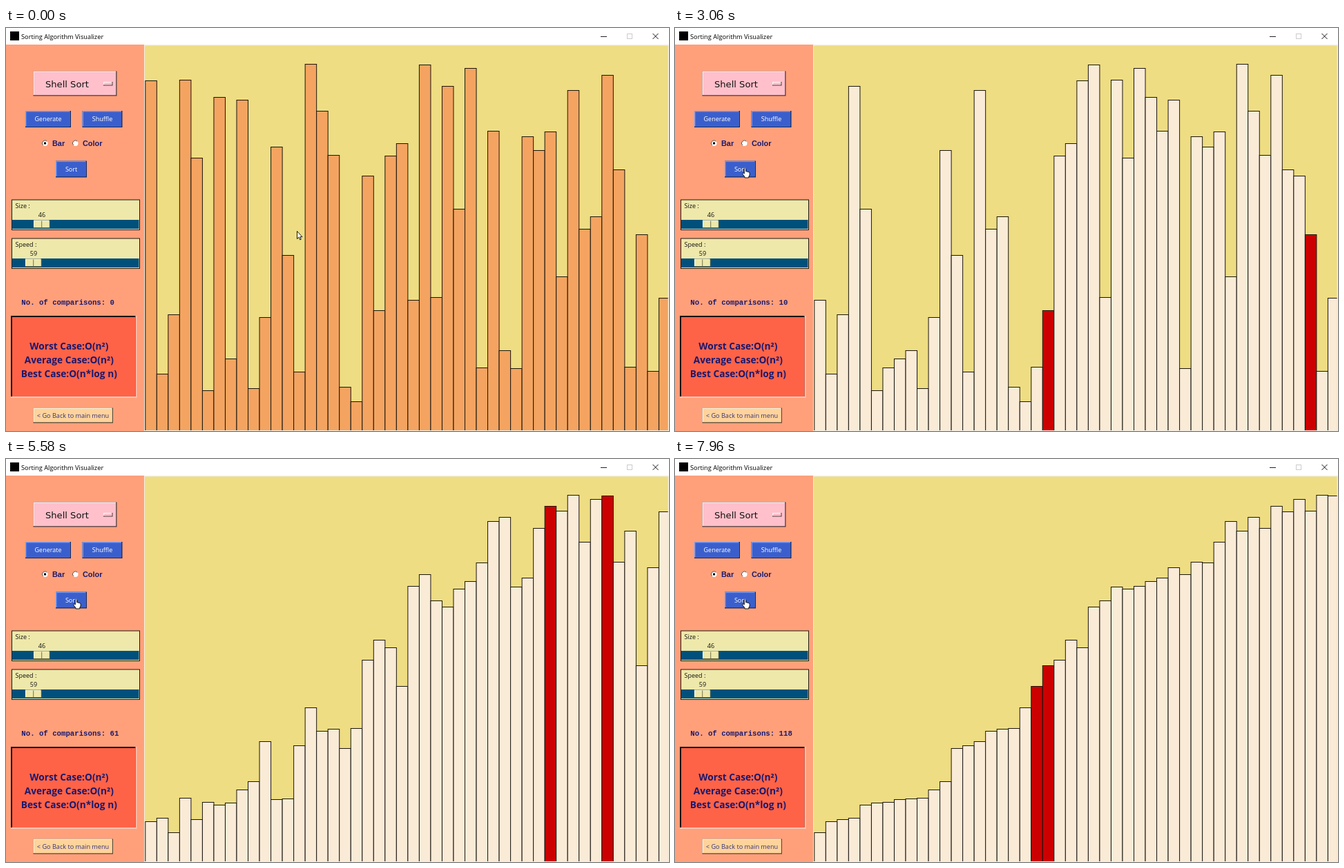
An HTML page with a canvas that plays this animation: 960 px wide and 584 px high, repeating every 8000 ms.

```html
<!DOCTYPE html>
<html lang="en">
<head>
<meta charset="utf-8">
<title>Sorting Algorithm Visualizer</title>
<style>
  html, body { margin: 0; width: 100%; height: 100%; overflow: hidden; background: #fff; }
  canvas { display: block; width: 960px; height: 584px; }
</style>
</head>
<body>
<canvas id="stage" width="960" height="584"></canvas>
<script>
const ctx = document.getElementById('stage').getContext('2d');
const LOOP = 8000, SORT_START = 2370, TICK = 46.55;
const SANS = '"Open Sans", "Noto Sans", sans-serif';
const NAVY = '#191970', BLUE = '#3a5fcd', CREAM = '#eee8aa';

// Top edge of each bar; a smaller number is a taller bar.
const tops = [76, 501, 415, 75, 188, 525, 100, 479, 104, 522, 419, 172, 329, 498, 52, 120,
  184, 520, 541, 214, 409, 185, 167, 394, 53, 390, 84, 262, 58, 492, 149, 467, 493, 157,
  177, 150, 360, 90, 291, 273, 68, 205, 491, 299, 497, 391];

// Shell sort, logged as a list of timed redraws.
function shellSort(start) {
  const a = start.slice(), log = [];
  let clock = 0, count = 0;
  const draw = (lo, hi, swap) => {
    log.push({ at: clock, bars: a.slice(), lo, hi, count, swap });
    clock += 9;
  };
  for (let gap = a.length >> 1; gap > 0; gap >>= 1) {
    for (let i = gap; i < a.length; i++) {
      draw(i - gap, i, 0);
      for (let j = i; j >= gap && a[j - gap] < a[j]; j -= gap) {
        [a[j], a[j - gap]] = [a[j - gap], a[j]];
        draw(j - gap, j, count + 1);
        count++;
      }
      clock += 19;
    }
  }
  return log;
}
const log = shellSort(tops);

// Pace of the sort: [screen tick, number of swaps done]
const pace = [[0, 0], [31, 23], [48, 40], [69, 62], [100, 98], [120, 119]].map(([tick, n]) =>
  [tick, n ? log.find(e => e.swap === n).at + 6 : 0]);

function sortState(t) {
  const tick = Math.min(120, Math.floor((t - SORT_START + 6) / TICK));
  let s = 0;
  while (s < pace.length - 2 && tick > pace[s + 1][0]) s++;
  const [k0, c0] = pace[s], [k1, c1] = pace[s + 1];
  const clock = c0 + (c1 - c0) * (tick - k0) / (k1 - k0);
  let n = 0;
  while (n < log.length - 1 && log[n + 1].at <= clock) n++;
  return log[n];
}

function box(x, y, w, h, fill) {
  ctx.fillStyle = fill;
  ctx.fillRect(x, y, w, h);
}

function line(color, width, ...p) {
  ctx.strokeStyle = color;
  ctx.lineWidth = width;
  ctx.beginPath();
  for (let i = 0; i < p.length; i += 2) ctx.lineTo(p[i], p[i + 1]);
  ctx.stroke();
}

function text(str, x, y, font, color, align = 'left') {
  ctx.font = font;
  ctx.fillStyle = color;
  ctx.textAlign = align;
  ctx.fillText(str, x, y);
}

// A panel with light and dark edges
function bevel(x, y, w, h, fill, light, dark, edge = 1.4) {
  box(x, y, w, h, dark);
  box(x, y, w - edge, h - edge, light);
  box(x + edge, y + edge, w - 2 * edge, h - 2 * edge, fill);
}

function button(label, x, y, w, h, pressed) {
  const edges = ['#7f9cf0', '#14285f'];
  if (pressed) edges.reverse();
  bevel(x, y, w, h, BLUE, ...edges);
  const d = pressed ? 0.7 : 0;
  text(label, x + w / 2 + d, y + h / 2 + 3.3 + d, '9px ' + SANS, '#fff', 'center');
}

function radio(x, label, on) {
  const y = 167;
  ctx.beginPath();
  ctx.arc(x, y, 4, 0, 7);
  ctx.fillStyle = '#fff';
  ctx.fill();
  ctx.lineWidth = 1;
  ctx.beginPath();
  ctx.arc(x, y, 4, Math.PI * 0.75, Math.PI * 1.75);
  ctx.strokeStyle = '#5c5450';
  ctx.stroke();
  if (on) {
    ctx.beginPath();
    ctx.arc(x, y, 1.7, 0, 7);
    ctx.fillStyle = '#000';
    ctx.fill();
  }
  text(label, x + 10.5, 171, 'bold 10.9px "Liberation Sans", Arial, sans-serif', NAVY);
}

function slider(y, label, value, x) {
  box(8, y, 186, 44.5, '#1c1a10');
  box(9, y + 1, 184, 42.5, CREAM);
  text(label, 13.5, y + 12, '9px ' + SANS, '#111');
  text(value, x + 12, y + 25, '9px ' + SANS, '#111', 'center');
  box(9, y + 29.5, 183.5, 13, '#00507c');
  bevel(x, y + 30, 23.5, 11.5, CREAM, '#fffbe0', '#6d683f', 1);
  line('#77724a', 1, x + 11.7, y + 31, x + 11.7, y + 41);
}

function titleBar() {
  box(0, 0, 960, 24, '#fff');
  box(6, 5, 13, 13, '#000');
  text('Sorting Algorithm Visualizer', 22, 15.6, '9.25px ' + SANS, '#000');
  line('#222', 1, 861, 12.5, 870, 12.5);
  ctx.strokeStyle = '#ccc';
  ctx.strokeRect(899.5, 8.5, 7, 7);
  line('#111', 1, 936.5, 8, 944.5, 16);
  line('#111', 1, 944.5, 8, 936.5, 16);
}

function sidePanel(count, pressed) {
  box(0, 24, 200, 560, '#ffa07a');
  bevel(39.5, 62.5, 121, 36, '#ffc0cb', '#ffe9ed', '#4f3a3e');
  text('Shell Sort', 57, 86, '13.1px "DejaVu Sans", sans-serif', '#111');
  bevel(141, 78, 13.5, 5.5, '#ffc0cb', '#fff0f2', '#4f3a3e', 1.2);

  button('Generate', 28, 120, 66, 24);
  button('Shuffle', 110.5, 120, 58, 24);
  radio(56.5, 'Bar', true);
  radio(100.5, 'Color', false);
  button('Sort', 72, 192.5, 45, 24, pressed);

  slider(248.5, 'Size :', '46', 40);
  slider(304.5, 'Speed :', '59', 28);

  text('No. of comparisons: ' + count, 22.3, 400.5,
    'bold 10.7px "Liberation Mono", "Courier New", monospace', NAVY);

  bevel(7, 417, 182.5, 119, '#ff6347', '#180805', '#ffc3b4', 2);
  ['Worst Case:O(n²)', 'Average Case:O(n²)', 'Best Case:O(n*log n)'].forEach((s, i) =>
    text(s, 91.3, 466 + 20 * i, 'bold 13.7px ' + SANS, NAVY, 'center'));

  bevel(39.5, 550.5, 115.5, 22, '#ffd39b', '#fff0da', '#5a4a36');
  text('< Go Back to main menu', 97, 564.8, '9.15px ' + SANS, '#33337c', 'center');
}

function chart(state) {
  box(200, 24, 760, 560, '#f3efe4');
  ctx.save();
  ctx.beginPath();
  ctx.rect(201, 25.5, 757.6, 557.5);
  ctx.clip();
  box(201, 25, 759, 559, '#eedd82');
  ctx.strokeStyle = '#1a1510';
  ctx.lineWidth = 1;
  const bars = state ? state.bars : tops;
  bars.forEach((top, i) => {
    const x = 201.8 + 16.525 * i, y = top + 0.5;
    const hot = state && (i === state.lo || i === state.hi);
    ctx.fillStyle = !state ? '#f4a460' : hot ? '#cc0000' : '#faebd7';
    ctx.fillRect(x, y, 16.525, 590 - y);
    ctx.strokeRect(x, y, 16.525, 590 - y);
  });
  ctx.restore();
}

// Stepped progress of a pointer move, eased at both ends
function glide(t, start, end, steps) {
  if (t < start) return 0;
  const n = Math.floor((t - start) / (end - start) * (steps - 1) + 0.02) + 1;
  const p = Math.min(1, n / steps);
  return p * p * (3 - 2 * p);
}

function shape(x, y, path) {
  ctx.save();
  ctx.translate(x, y);
  const p = new Path2D(path);
  ctx.fillStyle = '#fff';
  ctx.fill(p);
  ctx.strokeStyle = '#000';
  ctx.lineWidth = 0.9;
  ctx.lineJoin = 'round';
  ctx.stroke(p);
  ctx.restore();
}

function pointer(t) {
  const a = glide(t, 570, 1170, 14), b = glide(t, 1500, 1990, 12);
  const x = 421.5 - 261 * a - 59 * b, y = 294.5 - 86 * a - 5.5 * b;
  if (x < 117) {
    shape(x, y, 'M-1.2 8V1Q0-.8 1.2 1V5Q2.6 4 3.3 5.4Q4.7 4.7 5.2 6Q6.6 5.6 6.6 7.3V10L5.2 12.8V14H-.6V12.6L-3.8 8.4Q-3.6 6.6-2.2 7.2Z');
  } else {
    shape(x, y, 'M0 0V11L2.5 8.8 4.2 12.4 5.8 11.7 4.2 8.2H7.5Z');
  }
}

function render(t) {
  const state = t >= SORT_START ? sortState(t) : null;
  titleBar();
  sidePanel(state ? state.count : 0, t >= 2140 && t < SORT_START);
  chart(state);
  pointer(t);
}

function frame() {
  render(performance.now() % LOOP);
  requestAnimationFrame(frame);
}
frame();
</script>
</body>
</html>
```
